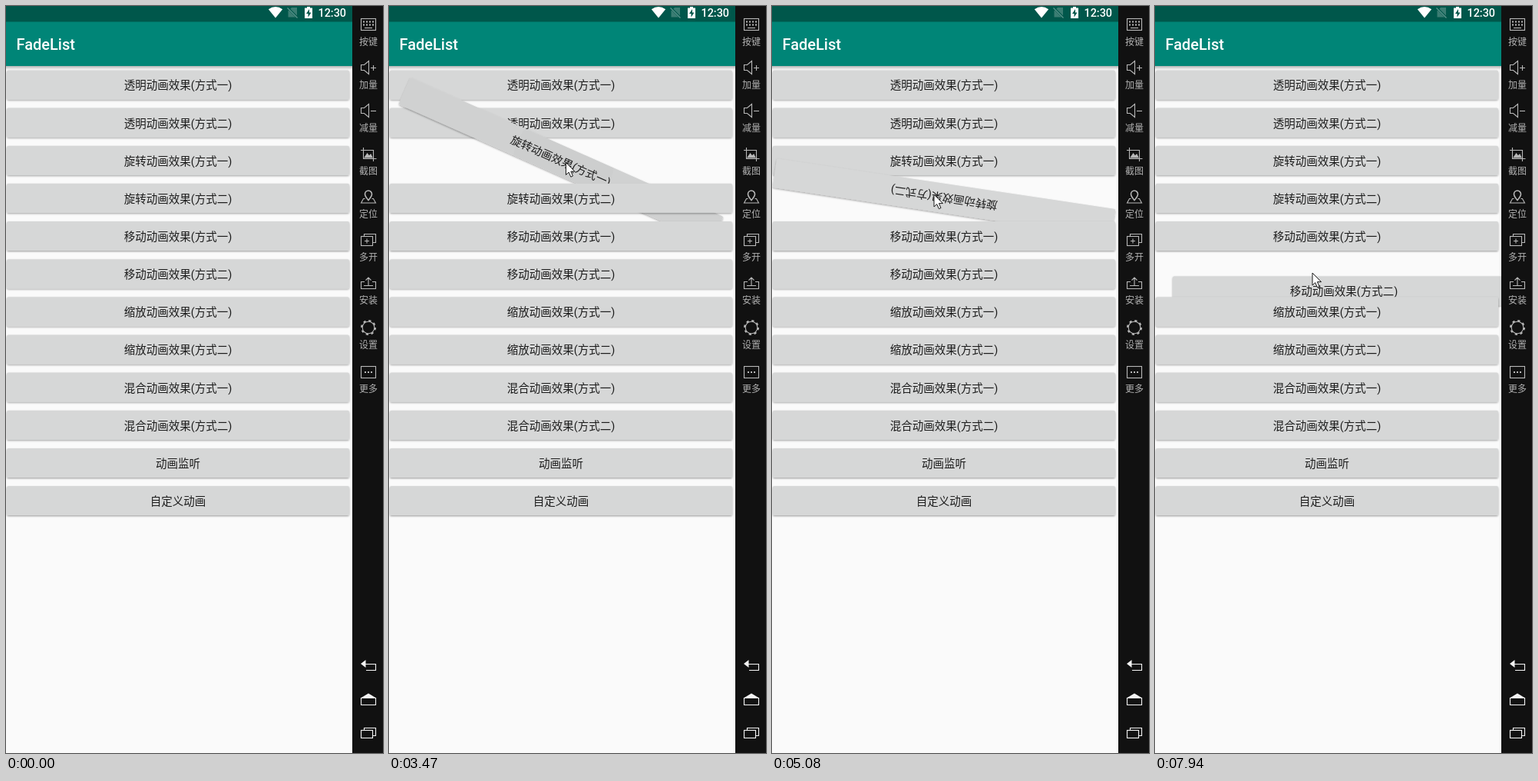
An HTML page for the animation above (8000 ms loop, 491 by 971 pixels).

```html
<!DOCTYPE html>
<html lang="zh-CN">
<head>
<meta charset="utf-8">
<title>FadeList</title>
<style>
html, body { margin: 0; width: 100%; height: 100%; overflow: hidden; background: #fafafa; }
svg { display: block; position: absolute; left: 0; top: 0; }
text { font-family: Roboto, "Noto Sans CJK SC", "Noto Sans CJK", sans-serif; }
.label { font-size: 14.5px; fill: #1c1c1c; text-anchor: middle; }
.side { font-size: 12px; fill: #b2b2b2; text-anchor: middle; }
.line { fill: none; stroke: #b8b8b8; stroke-width: 1.1; }
.nav { fill: none; stroke: #f4f4f4; stroke-width: 1.1; }
</style>
</head>
<body>
<svg id="stage" width="491" height="971" viewBox="0 0 491 971">
  <defs>
    <filter id="shade" x="-5%" y="-12%" width="110%" height="130%">
      <feDropShadow dx="0" dy="1.2" stdDeviation="0.8" flood-color="#000" flood-opacity="0.36"/>
    </filter>
    <linearGradient id="drop" x1="0" y1="0" x2="0" y2="1">
      <stop offset="0" stop-opacity="0.28"/>
      <stop offset="1" stop-opacity="0"/>
    </linearGradient>
    <clipPath id="face"><rect x="-223" y="-19" width="446" height="38" rx="2"/></clipPath>
    <clipPath id="view"><rect y="78" width="451" height="893"/></clipPath>
  </defs>

  <rect width="491" height="971" fill="#fafafa"/>
  <g id="list" clip-path="url(#view)"></g>

  <rect y="78" width="451" height="5" fill="url(#drop)"/>
  <rect y="20" width="451" height="58" fill="#008577"/>
  <rect width="451" height="20.5" fill="#00574b"/>
  <text x="13.5" y="57" font-size="20" font-weight="500" fill="#fff">FadeList</text>

  <path d="M351 15.5L341.8 4.2Q351-2.2 360.2 4.2Z" fill="#fff"/>
  <path d="M372 2h7v12.5h-11.5V6.500Z" fill="#3b7d73"/>
  <path d="M366.500 2L380 15.500" stroke="#00574b" stroke-width="3"/>
  <path d="M366.500 2.500L379.500 15.500" stroke="#5d958d" stroke-width="1.2"/>
  <path d="M389 2.500h3V1h4v1.500h3V16h-10Z" fill="#fff"/>
  <path d="M395 4l-4 6h2.500v4.500l4-6H395Z" fill="#00574b"/>
  <text x="406.500" y="14" font-size="14.4" font-weight="500" fill="#fff">12:30</text>

  <rect x="451" width="40" height="971" fill="#111"/>
  <g class="line">
    <rect x="462.500" y="16.500" width="19" height="15"/>
    <path d="M465 20.500h14M465 24.500h14" stroke-width="2" stroke-dasharray="2 2"/>
    <path d="M467 28.500h10"/>
    <path id="horn" d="M462.500 76.500h4l6-5v17l-6-5h-4Z"/>
    <path d="M475 80.500h7M478.500 77v7"/>
    <use href="#horn" y="56"/>
    <path d="M475 136.500h7"/>
    <path d="M465.500 184v14.500h17M462 187.500h16.500V202"/>
    <path d="M467 197l3.500-5 2.500 3 2-2 2 4Z" fill="#b8b8b8"/>
    <path d="M472 252.500C469 249 467.500 247 467.500 244.500a4.500 4.500 0 0 1 9 0C476.500 247 475 249 472 252.500Z" stroke-width="1.6"/>
    <path d="M467.500 250.500h-2l-3 5.500h19l-3-5.500h-2"/>
    <rect x="462.500" y="299.500" width="15" height="12"/>
    <path d="M466.500 299v-2.500h15v11h-3.500M467 305.500h6M470 302.500v6"/>
    <path d="M467 358.500h-4.500v9h19v-9h-4.500M472 364v-11M468.500 356.500l3.500-3.500 3.500 3.500M466 363.500h12"/>
    <circle cx="472" cy="418" r="7.800"/>
    <circle cx="472" cy="418" r="9" stroke-width="2" stroke-dasharray="3.200 3.870"/>
    <rect x="462.500" y="468.500" width="19" height="15"/>
    <path d="M467 476h10" stroke-width="2" stroke-dasharray="2 2"/>
  </g>
  <g id="side"></g>
  <g class="nav">
    <path d="M468 855.500h13.500v8H469"/>
    <path d="M462 855l6.500-5v10Z" fill="#f4f4f4" stroke="none"/>
    <path d="M462.500 899.500v9h19v-9Z"/>
    <path d="M462 899.500l10-6 10 6Z" fill="#f4f4f4" stroke="none"/>
    <rect x="462.500" y="941.500" width="15" height="10"/>
    <path d="M466.500 941v-2.500h15v10h-3.500"/>
  </g>

  <path id="cursor" d="M0 0V16L3.700 12.600 6.400 18.700 9 17.500 6.400 11.600H11.500Z" fill="#fff" stroke="#1a1a1a" stroke-linejoin="round"/>
</svg>
<script>
const LOOP = 8000, RUN = 1000;
const NS = "http://www.w3.org/2000/svg";
const byId = id => document.getElementById(id);

function add(parent, tag, attrs, text) {
  const el = document.createElementNS(NS, tag);
  for (const k in attrs) el.setAttribute(k, attrs[k]);
  if (text) el.textContent = text;
  return parent.appendChild(el);
}

// Screen refreshes: first time, last time, count
const bursts = [
  [150, 930, 11], [1160, 1230, 2], [1390, 2080, 10], [2230, 2310, 2],
  [2540, 3090, 8], [3240, 4010, 11], [4090, 4320, 4], [4470, 5230, 11],
  [5310, 5770, 7], [5920, 6700, 11], [6780, 7170, 6], [7400, 7940, 8]
];

// Pointer path: time, x, y
const path = [
  [150, 403, 958], [300, 401, 785], [540, 357, 388], [700, 322, 248],
  [770, 315, 208], [930, 274, 101], [1390, 274, 101], [2080, 240, 155],
  [2540, 240, 155], [3090, 233, 198], [3400, 233, 198], [4010, 211, 245],
  [5310, 211, 245], [5770, 195, 297], [6080, 195, 297], [6700, 200, 347],
  [6780, 200, 347], [7170, 205, 347], [LOOP, 205, 347]
];

// One action per button, from the top
const acts = [
  { kind: "fade", press: 1100, start: 1190 },
  { kind: "fade", press: 2170, start: 2240 },
  { kind: "spin", press: 3180, start: 3305 },
  { kind: "spin", press: 4420, start: 4563 },
  { kind: "move", press: 5920, start: 6005 },
  { kind: "move", press: 7360, start: 7536 }
];

const labels = [..."透明 旋转 移动 缩放 混合".split(" ")
  .flatMap(n => ["一", "二"].map(k => `${n}动画效果(方式${k})`)), "动画监听", "自定义动画"];

const buttons = labels.map((name, i) => {
  const y = 102.4 + i * 49.15;
  const outer = add(byId("list"), "g", { filter: "url(#shade)" });
  const body = add(outer, "g", { transform: `translate(224 ${y})` });
  const box = { x: -223, y: -19, width: 446, height: 38, rx: 2 };
  add(body, "rect", { ...box, fill: "#d6d7d7" });
  const ink = add(body, "g", { "clip-path": "url(#face)", opacity: 0 });
  add(ink, "rect", { ...box, opacity: 0.06 });
  const ripple = add(ink, "circle", { cy: 0, opacity: 0.035 });
  add(body, "text", { class: "label", y: 6 }, name);
  return { y, outer, body, ink, ripple };
});

"按键 加量 减量 截图 定位 多开 安装 设置 更多".split(" ").forEach((s, i) =>
  add(byId("side"), "text", { class: "side", x: 472, y: 51 + 56 * i + Math.max(0, i - 6) * 1.6 }, s));

const clamp = v => Math.min(1, Math.max(0, v));
const ease = p => 0.5 - Math.cos(Math.PI * p) / 2;

function snap(t) {
  let at = 0;
  for (const [a, b, n] of bursts) {
    if (t < a) break;
    const step = (b - a) / (n - 1);
    at = Math.min(b, a + Math.floor((t - a) / step + 1e-6) * step);
  }
  return at;
}

function pointer(t) {
  const i = Math.max(1, path.findIndex(p => p[0] >= t));
  const [a, b] = [path[i - 1], path[i]];
  const p = clamp((t - a[0]) / (b[0] - a[0]));
  return [a[1] + (b[1] - a[1]) * p, a[2] + (b[2] - a[2]) * p];
}

function drawButton({ y, outer, body, ink, ripple }, { kind, press, start }, t) {
  const p = (t - start) / RUN;
  const on = p >= 0 && p < 1;
  const f = on ? ease(p) : 0;
  const shift = kind === "move" ? 62.7 * f : 0;
  const turn = kind === "spin" ? 360 * f : 0;
  body.setAttribute("transform", `translate(${224 + shift} ${y + shift}) rotate(${turn})`);
  outer.setAttribute("opacity", kind === "fade" && on ? f : 1);

  const age = t - press;
  ink.setAttribute("opacity", age < 0 ? 0 : 1 - clamp((t - start) / 300));
  ripple.setAttribute("cx", (pointer(press)[0] - 224) * (1 - clamp(age / 500)));
  ripple.setAttribute("r", 15 + Math.max(0, age) * 0.175);
}

function draw(time) {
  const t = snap(time);
  acts.forEach((act, i) => drawButton(buttons[i], act, t));
  const [x, y] = pointer(t);
  const cursor = byId("cursor");
  cursor.setAttribute("transform", `translate(${x} ${y})`);
  cursor.setAttribute("visibility", t < 150 ? "hidden" : "visible");
}

const origin = performance.now();
function tick() {
  draw((performance.now() - origin) % LOOP);
  requestAnimationFrame(tick);
}
tick();
</script>
</body>
</html>
```
